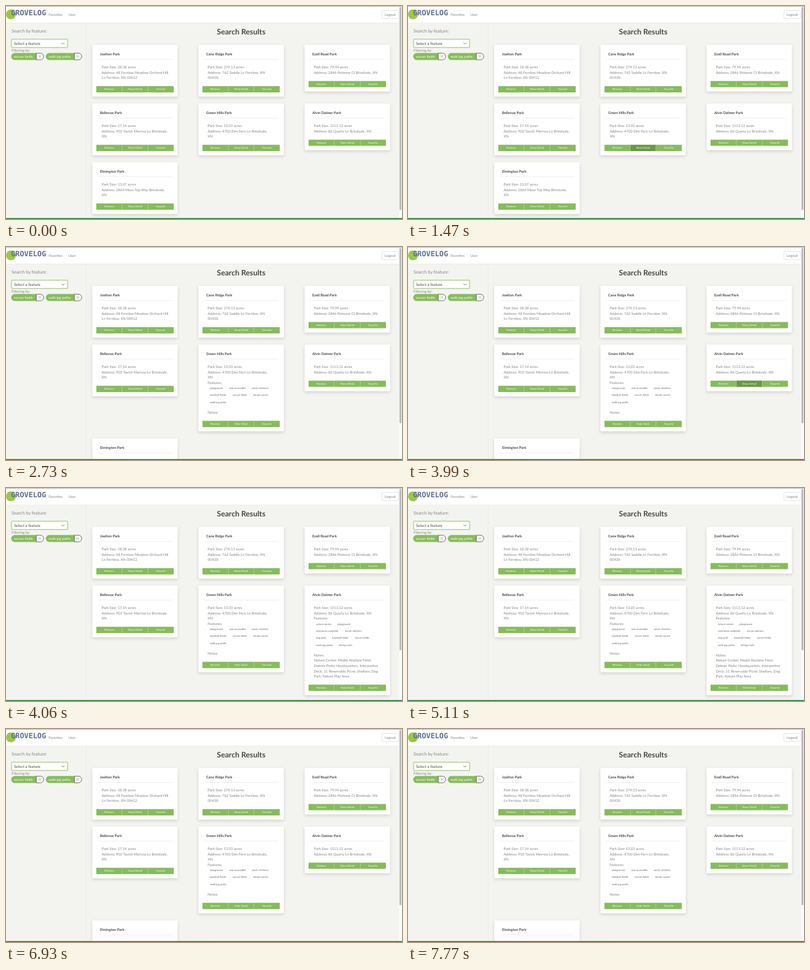
Animation, 640 px wide and 345 px high, one loop 7.84 s. Source, as an HTML page:

```html
<!DOCTYPE html>
<html lang="en">
<head>
<meta charset="utf-8">
<title>Park search</title>
<style>
  html, body { margin: 0; width: 100%; height: 100%; overflow: hidden; background: #f3f4ef; }
  svg { display: block; width: 640px; height: 345px; }
  text { font-family: Lato, "Open Sans", sans-serif; text-rendering: geometricPrecision; white-space: pre; }
  .card { fill: #fff; filter: drop-shadow(0 2px 2.5px rgba(0, 0, 0, .14)); }
  .brand { font-family: "DejaVu Sans Mono", monospace; }
</style>
</head>
<body>
<svg id="stage" viewBox="0 0 640 345"></svg>
<script>
const LOOP = 7840, GREEN = '#86bc5b', GREY = '#858585', DARK = '#484848';
const stage = document.getElementById('stage');

const rect = (x, y, w, h, fill, more = '') =>
  `<rect x="${x}" y="${y}" width="${w}" height="${h}" fill="${fill}" ${more}/>`;
const text = (x, y, size, fill, str, more = '') =>
  `<text x="${x}" y="${y}" font-size="${size}" fill="${fill}" ${more}>${str}</text>`;
const path = (d, stroke, width = .7, fill = 'none') =>
  `<path d="${d}" stroke="${stroke}" stroke-width="${width}" fill="${fill}"/>`;
const bold = 'font-weight="700"';

const columns = [139.5, 311, 482.5];
const parks = [
  { name: 'Joelton Park', size: '18.38', address: ['48 Fernlow Meadow Orchard Hill', 'Ln Fernlow, XN 00412'] },
  { name: 'Cane Ridge Park', size: '274.13', address: ['762 Saddle Ln Fernlow, XN', '00438'] },
  { name: 'Ezell Road Park', size: '79.94', address: ['2846 Pelmore Ct Brindvale, XN'] },
  { name: 'Bellevue Park', size: '17.14', address: ['903 Tavish Merrow Ln Brindvale,', 'XN'] },
  { name: 'Green Hills Park', size: '13.03', address: ['4700 Dim Fern Ln Brindvale,', 'XN'],
    tags: [[[18.5, 'playground'], [50, 'ada accessible'], [86.5, 'picnic shelters']],
           [[18.5, 'baseball fields'], [55.5, 'soccer fields'], [88.5, 'tennis courts']],
           [[18.5, 'walk jog paths']]],
    notes: [] },
  { name: 'Alvin Dalmer Park', size: '1113.12', address: ['86 Quorly Ln Brindvale, XN'],
    tags: [[[18.5, 'nature center'], [53, 'playground']],
           [[18.5, 'restrooms available'], [65.5, 'picnic shelters']],
           [[18.5, 'dog park'], [44.5, 'baseball fields'], [81.5, 'soccer fields']],
           [[18.5, 'walk jog paths'], [55.5, 'hiking trails']]],
    notes: ['Nature Center, Model Airplane Field,', 'Dalmer Parks\' Headquarters, Interpretive',
            'Deck, 11 Reservable Picnic Shelters, Dog', 'Park, Nature Play Area'] },
  { name: 'Elmington Park', size: '13.07', address: ['2864 Moss Top Way Brindvale,', 'XN'] }
];

function card(park, x, y, open, hover) {
  const lines = park.address.length;
  let buttonY = 50 + 8.4 * lines, details = '';
  const line = (dy, str) => text(x + 15, y + dy, 5.8, GREY, str);
  if (open) {
    const featureY = 46.5 + 8.5 * lines, tagY = featureY + 8.6;
    details += line(featureY, 'Features:');
    park.tags.forEach((row, r) => row.forEach(([dx, str]) =>
      details += text(x + dx, y + tagY + r * 11.3, 4.2, '#8c8c8c', str, bold)));
    const noteY = tagY + park.tags.length * 11.3 + 6;
    details += line(noteY, 'Notes:');
    park.notes.forEach((str, i) => details += line(noteY + 8.6 * (i + 1), str));
    buttonY = park.notes.length ? 160.5 : 123.5;
  }
  const bx = x + 6.5, by = y + buttonY, bw = 125 / 3;
  let out = rect(x, y, 138, buttonY + 17, '#fff', 'class="card" rx="1.4"')
    + text(x + 12.5, y + 16.8, 5.8, DARK, park.name, bold)
    + rect(x + 9, y + 23.2, 120, .5, '#dedede')
    + line(38.2, `Park Size: ${park.size} acres`)
    + park.address.map((str, i) => line(46.7 + 8.5 * i, (i ? '' : 'Address: ') + str)).join('')
    + details + rect(bx, by, 125, 10.2, GREEN, 'rx=".8"');
  if (hover) out += rect(bx + bw, by, bw, 10.2, '#557b36', `opacity="${.55 * hover}"`);
  out += [1, 2].map(i => rect(bx + bw * i - .25, by, .5, 10.2, '#cfe3bd')).join('');
  return out + ['Reviews', open ? 'Hide Detail' : 'Show Detail', 'Favorite'].map((str, i) =>
    text(bx + bw * (i + .5), by + 6.6, 4.3, '#f7fbf3', str, 'text-anchor="middle"')).join('');
}

function chip(x, w, str) {
  const r = x + w;
  return path(`M${r} 76.3H${x + 5.5}a5.5 5.5 0 0 0 0 11H${r}z`, GREEN, .3, GREEN)
    + text(x + 4.3, 83.7, 5.7, '#fff', str)
    + path(`M${r} 76.4h6.5a5.4 5.4 0 0 1 0 10.8H${r}z`, '#555', .8, '#f6f6f3')
    + path(`M${r + 4} 80l3.6 3.6m0 -3.6l-3.6 3.6`, '#888', .5);
}

const frame = rect(0, 0, 640, 345, '#f3f4ef')
  + rect(0, 0, 635, 27, '#fff') + rect(0, 27, 635, .5, '#e6e6e4')
  + rect(129.4, 27, .6, 317, '#e5e6e1')
  + '<circle cx="8" cy="13.5" r="8" fill="#9cc64b"/>'
  + text(8, 14.8, 11.8, '#596f9d', 'GROVELOG', bold + ' class="brand"')
  + text(69, 15.5, 5.7, GREY, 'Favorites') + text(101, 15.5, 5.7, GREY, 'User')
  + rect(607.6, 7.2, 27, 13, '#fff', 'stroke="#d2d2d2" stroke-width=".6" rx="1"')
  + text(612, 15.5, 5.9, GREY, 'Logout')
  + text(9, 43, 7.25, '#858585', 'Search by feature:')
  + rect(9, 53.8, 90.7, 13.4, '#fff', `stroke="${GREEN}" stroke-width=".9" rx=".6"`)
  + text(13, 62.6, 6.25, DARK, 'Select a feature')
  + path('M89.8 59.4l2.3 2.3l2.3 -2.3', '#555', .8)
  + text(9, 74, 5.8, GREY, 'Filtering by:')
  + chip(8.5, 40.5, 'soccer fields') + chip(64.5, 46, 'walk jog paths')
  + text(380, 46, 12.2, DARK, 'Search Results', bold + ' text-anchor="middle"');

function page(openHills, openDalmer, hoverHills, hoverDalmer) {
  const lastRow = openDalmer ? 347 : openHills ? 310 : 253;
  const thumb = openDalmer ? 263 : openHills ? 285.5 : 330.5;
  const rows = [63, 158, lastRow];
  return frame + parks.map((park, i) => card(park, columns[i % 3], rows[Math.floor(i / 3)],
      i === 4 ? openHills : i === 5 && openDalmer,
      i === 4 ? hoverHills : i === 5 ? hoverDalmer : 0)).join('')
    + rect(635, 0, 5, 345, '#fafafa')
    + rect(635.9, 1.5, 3.2, thumb - 1.5, '#bcbcbc', 'rx="1.6"')
    + rect(0, 0, 640, .8, '#a5a5a5')
    + rect(0, 343.6, 640, 1.4, '#14771c');
}

const fade = (t, start) => Math.min(1, Math.max(0, (t - start) / 140));
const during = (t, from, to) => t >= from && t < to;
let shown = '';

function tick(now) {
  const t = Math.floor(now % LOOP / 70) * 70;
  const state = [
    t >= 1540,
    during(t, 4060, 6930),
    t < 1540 ? fade(t, 840) : 0,
    during(t, 6790, 6930) ? 1 : t < 4060 ? fade(t, 2800) : 0
  ];
  const key = state.join();
  if (key !== shown) {
    shown = key;
    stage.innerHTML = page(...state);
  }
  requestAnimationFrame(tick);
}
tick(performance.now());
</script>
</body>
</html>
```
